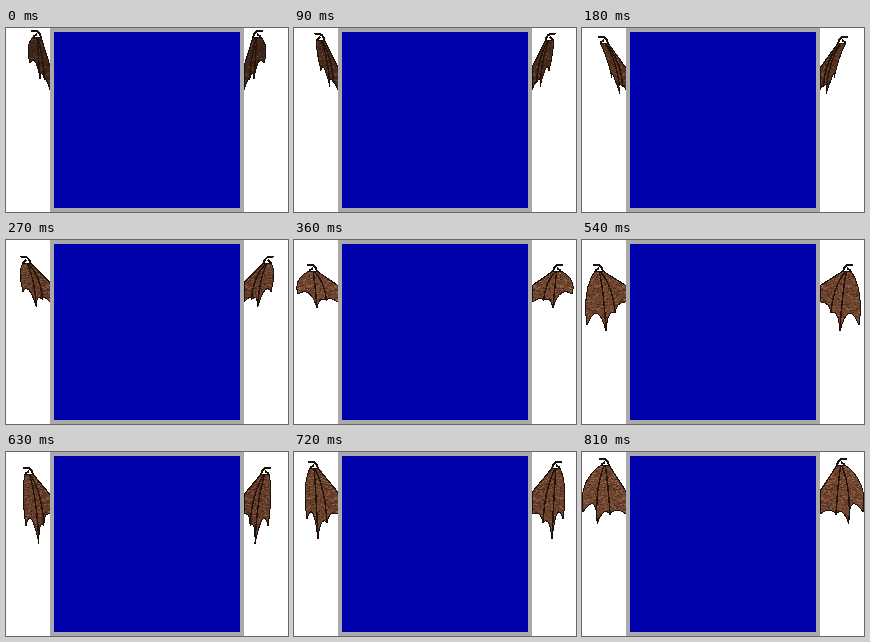
An HTML page that plays this animation: 282 by 184 pixels, repeating every 0.9 s.

```html
<!DOCTYPE html>
<html lang="en">
<head>
<meta charset="utf-8">
<title>Winged panel</title>
<style>
  html, body { margin: 0; width: 100%; height: 100%; overflow: hidden; background: #fff; }
  svg { display: block; width: 282px; height: 184px; }
</style>
</head>
<body>
<svg viewBox="0 0 282 184" shape-rendering="crispEdges">
  <defs>
    <clipPath id="clip"><path id="edge"/></clipPath>
    <g id="wing" fill="none">
      <g clip-path="url(#clip)">
        <path id="skin"/>
        <path id="dark" stroke="#2c170e" stroke-opacity=".5"/>
        <path id="light" stroke="#c08a64" stroke-opacity=".4"/>
        <path id="bones" stroke="#24140c" stroke-width="1.5"/>
      </g>
      <path id="line" stroke="#1c100a"/>
      <path id="claw" stroke="#1c100a" stroke-width="2"/>
    </g>
  </defs>
  <rect width="282" height="184" fill="#fff"/>
  <use href="#wing"/>
  <use href="#wing" transform="matrix(-1 0 0 1 282 0)"/>
  <rect x="44" width="194" height="184" fill="#aaa"/>
  <rect x="48" y="4" width="186" height="176" fill="#0000ad"/>
</svg>
<script>
const STEP = 90, ROOT = [44, 62];
const get = id => document.getElementById(id);
const lerp = (a, b, t) => a.map((v, i) => v + (b[i] - v) * t);
const move = (p, dx, dy) => [p[0] + dx, p[1] + dy];
const curve = (c, p) => `Q${c} ${p}`;

// A pose: wrist, outer finger tip, lower finger tip and skin lightness
const pose = (wrist, outer, lower, tone) => ({ wrist, outer, lower, tone });
const between = (a, b) => pose(
  lerp(a.wrist, b.wrist, .5), lerp(a.outer, b.outer, .5),
  lerp(a.lower, b.lower, .5), (a.tone + b.tone) / 2);

const folded = pose([31, 8], [24, 35], [34, 51], 17);
const narrow = pose([22, 14], [30, 50], [38, 66], 24);
const opening = pose([19, 30], [4, 54], [23, 68], 32);
const lowered = pose([17, 30], [5, 85], [24, 91], 31);
const swept = pose([23, 21], [20, 74], [33, 92], 28);
const raised = pose([20, 15], [13, 67], [24, 87], 30);
const spread = pose([23, 12], [1, 60], [15, 72], 32);
const cycle = [
  folded, between(folded, narrow), narrow, between(narrow, opening), opening,
  between(opening, lowered), lowered, swept, raised, spread
];

// Fingers leave the wrist sideways, then bend down to the tip
const finger = (wrist, tip, bow) =>
  curve([tip[0] - bow, wrist[1] + (tip[1] - wrist[1]) * .35], tip);

function grain(seed, count) {
  const rand = n => (seed = seed * 16807 % 2147483647) * n / 2147483647 | 0;
  let d = '';
  for (let i = 0; i < count; i++) d += `M${rand(44)} ${rand(94) + .5}h${1 + rand(2)}`;
  return d;
}

function draw({ wrist, outer, lower, tone }) {
  const shoulder = [ROOT[0], 35 + wrist[1] * .35];
  const inner = move(lerp(lower, ROOT, .45), 0, -5);
  const tips = [outer, lower, inner, ROOT];
  const front = move(wrist, -4, 1), back = move(wrist, 4, 1);

  let outline = `M${front}${finger(front, outer, 5)}`;
  for (let i = 1; i < tips.length; i++) {
    const middle = lerp(tips[i - 1], tips[i], .5);
    outline += curve(lerp(middle, wrist, .5 / i), tips[i]);
  }
  outline += `L${shoulder} ${back} ${front}Z`;

  for (const id of ['edge', 'skin', 'line']) get(id).setAttribute('d', outline);
  get('skin').setAttribute('fill', `hsl(20 40% ${tone}%)`);
  get('light').setAttribute('stroke-opacity', tone / 75);
  get('bones').setAttribute('d', `M${shoulder}L${back}` +
    [lower, inner].map(tip => `M${wrist}${finger(wrist, tip, 2)}`).join(''));
  get('claw').setAttribute('d', `M${back}q-2-8-10-6M${front}l4-3`);
}

get('dark').setAttribute('d', grain(71, 600));
get('light').setAttribute('d', grain(409, 450));

let start, shown = 0;
function tick(now) {
  start ??= now;
  const index = Math.floor((now - start) / STEP) % cycle.length;
  if (index !== shown) draw(cycle[shown = index]);
  requestAnimationFrame(tick);
}
draw(cycle[0]);
requestAnimationFrame(tick);
</script>
</body>
</html>
```
